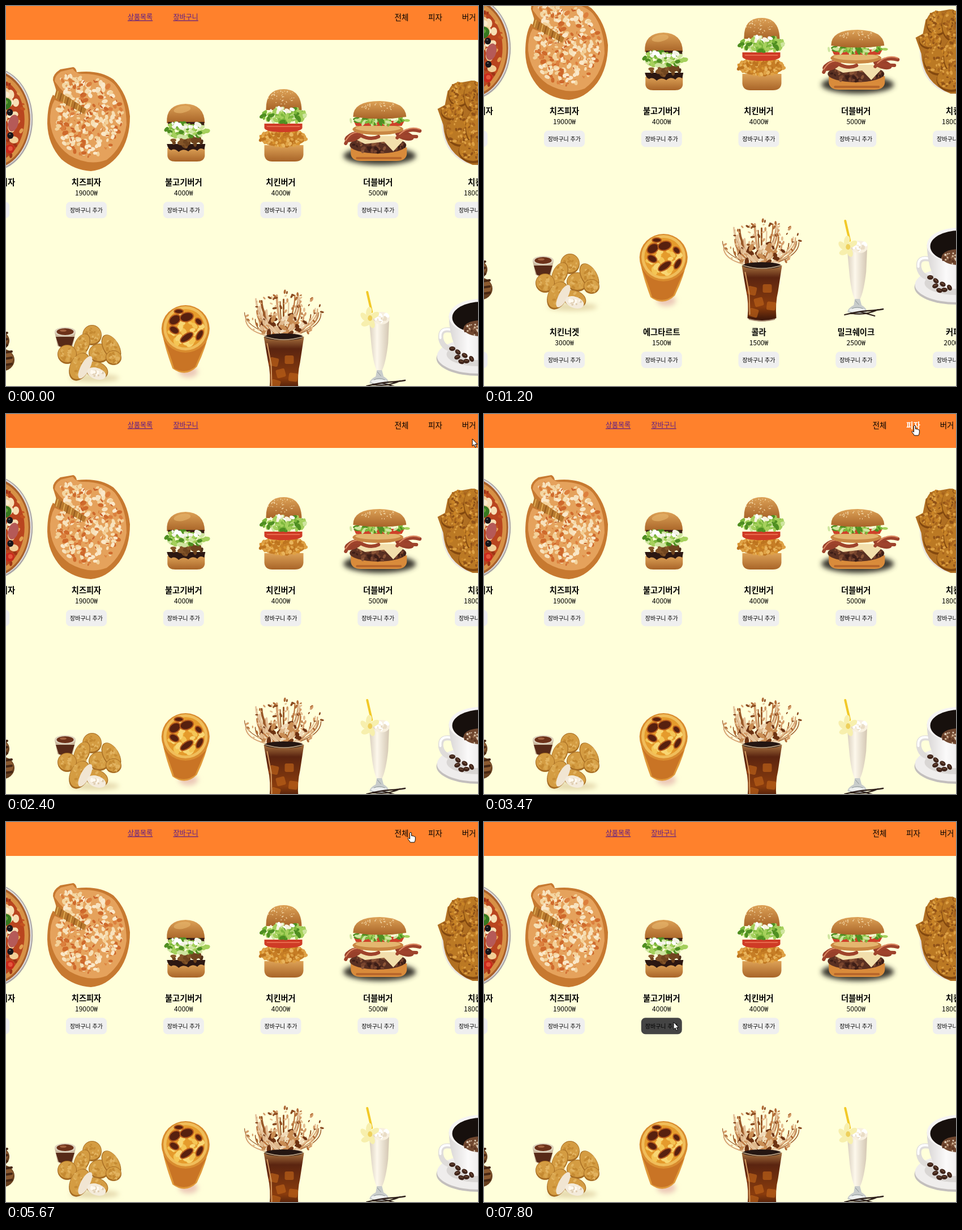
An HTML page that plays this animation: 834x672 px, repeating every 8 s.

```html
<!DOCTYPE html>
<html lang="ko">
<head>
<meta charset="utf-8">
<title>메뉴</title>
<style>
html, body { margin: 0; width: 100%; height: 100%; overflow: hidden; background: #fff; }
svg { display: block; }
text { font-family: "Noto Sans CJK KR", "Noto Sans KR", "Noto Sans CJK JP", sans-serif; }
.link { font-size: 12px; fill: #551a8b; text-decoration: underline; }
.nav { font-size: 13.5px; }
.card text { text-anchor: middle; }
.name { font-size: 14.25px; font-weight: 700; }
.price { font-size: 12px; }
.add { font-size: 10px; }
.btn { fill: #efefef; }
#pizzas, #burgers, #cursor, #hand { opacity: 0; }
</style>
</head>
<body>
<svg width="834" height="672" viewBox="0 0 834 672">
  <defs>
    <filter id="soft" x="-30%" y="-60%" width="160%" height="220%"><feGaussianBlur stdDeviation="4"/></filter>
    <linearGradient id="bun" x2="0" y2="1"><stop stop-color="#dda257"/><stop offset="1" stop-color="#a86428"/></linearGradient>
    <linearGradient id="cola" x2="0" y2="1"><stop stop-color="#b8844a"/><stop offset=".25" stop-color="#5a2410"/><stop offset=".75" stop-color="#8a3c0d"/><stop offset="1" stop-color="#35130a"/></linearGradient>
    <linearGradient id="milk"><stop stop-color="#d8cdbb"/><stop offset=".4" stop-color="#fdf8ec"/><stop offset="1" stop-color="#d3c6b1"/></linearGradient>
    <linearGradient id="china"><stop stop-color="#d9d6d5"/><stop offset=".5" stop-color="#fbfafa"/><stop offset="1" stop-color="#e6e3e2"/></linearGradient>
  </defs>
  <g id="page">
    <g id="all"><rect y="60" width="834" height="800" fill="#ffffda"/></g>
    <g id="pizzas"><rect y="60" width="834" height="368" fill="#ffffda"/></g>
    <g id="burgers"><rect y="60" width="834" height="368" fill="#ffffda"/></g>
    <rect width="834" height="60" fill="#ff812c"/>
    <g id="links">
      <text class="link" x="215" y="24.4">상품목록</text>
      <text class="link" x="295.5" y="24.4">장바구니</text>
    </g>
    <g id="menu">
      <text class="nav" x="686.5" y="25">전체</text>
      <text class="nav" x="746" y="25">피자</text>
      <text class="nav" x="805.7" y="25">버거</text>
    </g>
  </g>
  <g id="cursor" fill="#fff" stroke="#000" stroke-linejoin="round">
    <path id="arrow" d="M0 0V12.6L3 10L5 15L7.2 14L5.2 9.4H9Z"/>
    <path id="hand" d="M-1.5 1.2Q0-.8 1.5 1.2V6.5Q3 5.5 4 7Q5.5 6 6.3 7.8Q8 7 8.3 9V13Q8 16 6.5 18H-.5Q-2 15.5-4.5 12.5Q-5.5 10.5-3.5 10.3L-1.5 12Z"/>
  </g>
</svg>
<script>
const $ = id => document.getElementById(id);

let seed = 7;
const rnd = () => (seed = seed * 16807 % 2147483647) / 2147483647;

// Shapes
const oval = (x, y, rx, ry, fill, turn = 0, more = '') =>
  `<ellipse cx="${x}" cy="${y}" rx="${rx}" ry="${ry}" fill="${fill}" transform="rotate(${turn} ${x} ${y})" ${more}/>`;
const path = (d, fill, more = '') => `<path d="${d}" fill="${fill}" ${more}/>`;
const line = (d, color, width) => path(d, 'none', `stroke="${color}" stroke-width="${width}" stroke-linecap="round"`);
const specks = (n, x, y, rx, ry, colors, a, b = a) => Array.from({ length: n }, () => {
  const angle = rnd() * 2 * Math.PI, r = Math.sqrt(rnd()), size = .5 + rnd() / 2;
  return oval((x + rx * r * Math.cos(angle)).toFixed(1), (y + ry * r * Math.sin(angle)).toFixed(1),
    (a * size).toFixed(1), (b * size).toFixed(1), colors[rnd() * colors.length | 0], rnd() * 180 | 0);
}).join('');
const each = (points, draw) => points.map(p => draw(...p)).join('');
const food = (cx, dy, ...parts) => `<g transform="translate(${-cx} ${dy})">${parts.join('')}</g>`;

const greens = ['#4f8f22', '#7db83c', '#a5d05c', '#cfe5a0'];
const golds = ['#c98427', '#a8641d', '#dda044', '#8f5117'];
const seeds = (x, y, rx, ry) => specks(34, x, y, rx, ry, ['#f6dfb4', '#ecc993'], 1.6, .9);

const pepperoni = food(233.5, 0,
  oval(238, 209, 61, 79, '#9d8f6a', 0, 'filter="url(#soft)" opacity=".7"'),
  oval(235.5, 206, 62, 80, '#c98c3e'), oval(235, 205, 60, 77, '#ebc47c'), oval(235.5, 206, 54, 70, '#dba04a'),
  specks(130, 235, 206, 50, 66, ['#e9bd68', '#cf7a35', '#f0cd80', '#d48d3b'], 5, 3),
  each([[223, 149], [251, 151], [270, 165], [196, 173], [227, 187], [256, 197], [281, 209], [197, 210],
    [230, 226], [208, 248], [247, 253], [272, 241], [232, 275]],
    (x, y) => oval(x, y, 8.5, 10, '#93302a') + oval(x, y - .5, 7.5, 9, '#bf4a42') + specks(7, x, y, 6, 7, ['#d5705c', '#a5352f'], 2)),
  specks(85, 233, 208, 44, 58, ['#4b7a22', '#355d18', '#6b9433'], 2.2, 1.4));

const margherita = food(405.5, 0,
  oval(409, 200.5, 73.5, 92, '#aaa6a8'), oval(408.5, 200, 72, 90, '#e0dcda'),
  oval(409, 200.5, 69, 88, '#a9602a'), oval(409, 200.5, 66, 84, '#d79146'), oval(409, 200.5, 59, 76, '#b9451f'),
  specks(120, 409, 200, 61, 79, ['#d06c2b', '#9e3416', '#e3a052', '#c4511f'], 5, 3),
  specks(62, 408, 200, 50, 66, ['#f7dfb4', '#f2cf97', '#fbeccc'], 9, 7),
  each([[415, 153], [385, 167], [388, 201], [360, 215], [412, 265], [385, 237], [442, 253], [352, 190]],
    (x, y) => oval(x, y, 8, 8, '#c82a1c') + oval(x + 1, y - 1, 4, 4, '#e5573c')),
  oval(448, 207, 9, 15, '#b55a58', 15),
  each([[432, 173, 13, 11], [363, 201, 11, 8], [404, 245, 13, 8], [391, 153, 4, 7], [429, 224, 4, 8]],
    (x, y, rx, ry) => oval(x, y, rx, ry, '#35781f', -12) + oval(x - 1, y - 2, rx * .6, ry * .45, '#63a336', -12)),
  each([[401, 148], [428, 146], [372, 170], [396, 180], [442, 188], [415, 209], [386, 216], [443, 229], [426, 244], [382, 248]],
    (x, y) => oval(x, y, 5.5, 6, '#17151a') + oval(x - 1, y - 2, 1.5, 1.2, '#666')));

const cheese = food(142, 0,
  path('M83 131Q82 121 96 112L119 108Q124 110 125 117Q165 112 190 130Q215 155 219 195Q219 235 200 262Q178 290 150 292Q120 290 98 271Q74 245 73 208Q73 175 83 157L92 163L88 147Z', '#c77930'),
  path('M86 133Q86 123 97 116L118 111Q124 120 134 120Q172 119 192 139Q213 166 213 210Q207 250 178 272Q146 284 112 264Q82 243 78 205Q77 181 86 166L140 190L95 145Z', '#e5a25c'),
  specks(230, 146, 196, 59, 69, ['#f6dfb4', '#fae8c9', '#f3d19a', '#f7e2bd', '#dc7f3d', '#cf6a2c'], 6, 4),
  specks(26, 115, 133, 18, 13, ['#f3d6a2', '#d9813d', '#f8e3be'], 5, 3),
  specks(70, 146, 198, 58, 68, ['#c9602a', '#dc8440'], 4, 1.5),
  path('M89 148L142 182L138 191L85 162Z', '#b8792e'),
  Array.from({ length: 8 }, (_, i) => line(`M${92 + i * 6} ${151 + i * 4}l-3 12`, i % 2 ? '#8f561c' : '#e5b35a', 1.6)).join(''));

const bulgogi = food(313.5, 0,
  path('M285 251H351V265Q350 275 337 275H299Q286 275 285 265Z', 'url(#bun)'),
  path('M284 244H352L350 254Q343 249 338 256Q330 250 322 257Q313 251 305 258Q297 251 292 255Q286 254 284 244Z', '#2c1712'),
  path('M284 207Q282 174 317 173Q350 174 351 207Z', 'url(#bun)'),
  oval(311, 183, 15, 6, '#e8b76e', -10, 'opacity=".6"'),
  path('M286 205H350V212H286Z', '#3b2017'),
  specks(20, 319, 240, 31, 7, ['#70451f', '#845529', '#4e2e18'], 9, 5),
  specks(75, 319, 219, 36, 13, greens, 6, 4),
  specks(13, 316, 211, 27, 6, ['#fff', '#f4f3e6'], 5, 4));

const chicken = food(485, 0,
  path('M456 246H525V263Q524 275 510 275H470Q457 275 456 263Z', 'url(#bun)'),
  path('M459 184Q458 147 490 147Q521 147 522 184Z', 'url(#bun)'), seeds(489, 162, 26, 12),
  oval(489, 233, 41, 16, '#c67d25'),
  specks(100, 489, 233, 41, 16, ['#d9932f', '#e9b45c', '#bd741f', '#dfa145'], 4, 3),
  path('M456 208H523V216Q520 223 489 223Q459 223 456 216Z', '#cf3b26'), line('M461 213H518', '#e8694c', 2),
  specks(80, 490, 193, 39, 12, greens, 7, 4), specks(10, 488, 185, 24, 4, ['#fff', '#f7f3df'], 5, 3));

const double = food(657, 0,
  oval(660, 265, 64, 16, '#3d3a33', 0, 'filter="url(#soft)"'),
  path('M609 250H708V262Q706 274 690 274H627Q611 274 609 262Z', '#d98b3b'),
  line('M620 269H697', '#b8672b', 4),
  oval(657, 246, 50, 15, '#5a3022'), specks(60, 657, 247, 47, 12, ['#79452e', '#3d1e17', '#8d5638'], 5, 3),
  path('M609 230L707 230L700 240L684 257L668 240L634 244L618 236Z', '#f2dfac'),
  each([[614, 231], [704, 229]], (x, y) => oval(x, y, 17, 8, '#98402a', x < 650 ? -22 : 18)),
  line('M600 243Q610 220 627 229T658 231M691 233Q706 214 731 221M699 230L725 231', '#9f432c', 6),
  line('M600 238Q613 217 630 226M695 227Q712 211 731 218', '#dc8a63', 2),
  oval(657, 218, 45, 10, '#c98743'), oval(657, 216, 40, 6, '#e4b66f'),
  path('M614 203H704L699 212H618Z', '#cf412a'),
  specks(70, 658, 201, 51, 8, greens, 7, 3),
  path('M613 196Q613 168 660 168Q706 169 707 196Q660 203 613 196Z', 'url(#bun)'), seeds(660, 179, 36, 8));

const fried = food(828.5, 0,
  path('M769 205Q770 258 812 278L840 283V205Z', '#e9e5df'),
  path('M762 182L775 175L780 150L800 136L822 132L850 140V281H824Q775 262 772 210Z', '#b06f22'),
  each([[800, 157, 19, 22], [825, 160, 17, 28], [788, 188, 20, 15], [803, 222, 27, 27], [829, 215, 18, 32], [825, 257, 26, 21]],
    (x, y, rx, ry) => oval(x, y, rx, ry, '#83480f') + oval(x, y - 2, rx - 1, ry - 2, '#bb7924')
      + specks(48, x, y - 2, rx - 2, ry - 3, golds, 4, 2.5)));

const rolls = food(-29.75, -265,
  each([[-12, 466, 18, 17], [-8, 500, 23, 20]], (x, y, rx, ry) => oval(x, y, rx, ry, '#68401f') + oval(x, y - 3, rx - 2, ry - 5, '#8b5a30')),
  Array.from({ length: 6 }, (_, i) => line(`M-10 ${455 + i * 11}L${i < 3 ? 2 : 10} ${452 + i * 11}`, '#472713', 4)).join(''));

const nuggets = food(142, -265,
  oval(156, 532, 44, 7, '#e5d9ad', 0, 'filter="url(#soft)"'),
  path('M86 451L91 475Q104 484 118 475L123 451Z', '#c9b59b'), path('M88 459L93 475Q104 481 116 475L121 459Z', '#572a18'),
  oval(104.5, 450, 18.5, 8, '#ddd2bd'), oval(104.5, 450, 15, 6, '#6d321a'), oval(101, 448, 6, 2, '#a2613f'),
  each([[152, 456, 17, 18, 0], [134, 474, 13, 22, 25], [165, 488, 19, 17, 0], [186, 478, 14, 25, -30],
    [108, 490, 17, 17, 0], [190, 496, 14, 13, 0], [130, 512, 17, 26, 25], [160, 518, 21, 15, 20]],
    (x, y, rx, ry, a) => oval(x, y, rx, ry, '#a66c23', a) + oval(x, y - 1, rx - 1, ry - 2, '#d49c42', a)
      + specks(22, x, y, rx * .7, ry * .7, ['#e2b360', '#c58a32', '#d9a64e'], 4, 2.5)),
  oval(140, 513, 8, 22, '#f1e5d2', 28), oval(160, 524, 17, 10, '#f4ebdb', 18),
  specks(16, 160, 524, 12, 7, ['#fff9ef', '#dfcdb1'], 3));

const tart = food(313.5, -265,
  oval(322, 521, 17, 10, '#ecc9b8', 0, 'filter="url(#soft)"'),
  path('M275 447Q279 475 294 515Q317 532 337 512Q354 477 359 447Z', '#e0993a'),
  path('M278 463Q290 490 297 515Q317 526 334 512Q345 485 354 468Q316 505 278 463Z', '#c97425'),
  oval(317, 445, 42.5, 42, '#d98c2f'), oval(317, 444, 39, 39, '#f0bd5a'), oval(317, 444, 34, 34, '#e59b2c'),
  specks(30, 317, 444, 29, 29, ['#f4c555', '#f0ad35', '#f8d673'], 8, 5),
  each([[298, 429, 10, 7, -35], [319, 424, 11, 7, -15], [340, 432, 6, 4, 45], [297, 447, 8, 5, 30],
    [319, 460, 12, 5, -35], [342, 456, 4, 9, 30], [305, 414, 7, 3, 0]],
    (x, y, rx, ry, a) => oval(x, y, rx + 2, ry + 2, '#b5591b', a) + oval(x, y, rx, ry, '#57200f', a)));

const splash = Array.from({ length: 34 }, () => {
  const a = -2.75 + rnd() * 2.3, r = 45 + rnd() * 36;
  const x = 490 + r * Math.cos(a), y = 455 + r * Math.sin(a);
  return line(`M490 462Q${x.toFixed()} ${(y + 28).toFixed()} ${x.toFixed()} ${y.toFixed()}`,
    ['#bd7a43', '#9a5a2a', '#d6a272', '#e7c69f'][rnd() * 4 | 0], (1 + rnd() * 3).toFixed(1));
}).join('');
const cola = food(485, -265,
  splash,
  specks(110, 490, 422, 70, 45, ['#b06a35', '#d49c68', '#8a4b20', '#e4bd8f'], 4, 2),
  specks(50, 490, 440, 42, 22, ['#f0d9b8', '#c98d54', '#6d3313', '#dfb88c'], 8, 4),
  path('M455 459Q491 450 526 459L519 505Q514 525 516 552Q490 563 465 552Q468 525 462 500Z', 'url(#cola)'),
  each([[473, 503], [500, 499], [485, 523], [507, 530], [476, 542]],
    (x, y) => `<rect x="${x - 8}" y="${y - 7}" width="16" height="15" rx="3" fill="#b95f18" opacity=".7" transform="rotate(${x % 40 - 20} ${x} ${y})"/>`),
  oval(490.5, 459, 34, 6, '#241612'), line('M458 459Q490 469 524 459', '#c8ad8c', 1.5),
  line('M461 471L468 508L469 545', '#d49a61', 2), line('M468 554Q491 560 513 554', '#a88b74', 2));

const shake = food(657, -265,
  line('M638 380L646 415', '#f2c928', 4),
  path('M641 425Q659 408 677 425L675 470Q671 505 664 519H655Q648 505 645 470Z', 'url(#milk)'),
  oval(663, 426, 15, 11, '#f8f0df'), specks(16, 663, 425, 13, 8, ['#fff', '#e9dcc6'], 5, 3),
  each([[633, 424, 50], [641, 415, -80], [651, 421, -30], [636, 435, -20], [646, 435, 70]],
    (x, y, a) => oval(x, y, 9, 5, '#f7efad', a)), oval(643, 426, 4, 5, '#eed05c'),
  path('M655 518H664L667 529Q677 535 676 541Q659 549 642 541Q642 535 653 529Z', '#c8cccb'),
  oval(659, 538, 14, 4, '#eef0ef'), line('M656 521L662 528M650 535Q659 531 669 535', '#8c9596', 1),
  line('M637 546Q662 540 678 539T705 536M648 543Q672 548 696 537M665 541L690 548', '#30221c', 2.3));

const coffee = food(828.5, -265,
  oval(834, 497, 74, 31, '#c3bfbd'), oval(834, 493, 73, 31, '#efedec'), oval(834, 490, 56, 21, '#d9d6d4'),
  line('M789 448Q765 442 768 463Q772 482 797 482', '#dfdcda', 9), line('M788 447Q765 441 767 461', '#fff', 4),
  path('M782 422Q784 484 816 500H850V400Z', 'url(#china)'),
  oval(838, 423, 56, 31, '#f6f4f3'), oval(839, 425, 51, 28, '#17100d'),
  oval(838, 444, 30, 14, '#70472f'), specks(60, 833, 445, 25, 11, ['#ceb194', '#9c7052', '#5b3421', '#e4d4be'], 2),
  each([[788, 480, 0], [798, 486, 40], [797, 495, -20], [810, 492, 30], [813, 502, 0], [822, 498, 60], [804, 503, 20]],
    (x, y, a) => oval(x, y, 5.5, 4, '#3e2319', a) + oval(x, y - 1, 3.5, .8, '#75503c', a)));

// Cards
const pizzaMenu = [['페퍼로니피자', 20000, pepperoni], ['마르게리따피자', 23000, margherita], ['치즈피자', 19000, cheese]];
const burgerMenu = [['불고기버거', 4000, bulgogi], ['치킨버거', 4000, chicken], ['더블버거', 5000, double]];
const sideMenu = [['치즈스틱', 2000, rolls], ['치킨너겟', 3000, nuggets], ['에그타르트', 1500, tart],
  ['콜라', 1500, cola], ['밀크쉐이크', 2500, shake], ['커피', 2000, coffee]];

const row = (id, items, left, top = 0) => $(id).insertAdjacentHTML('beforeend', items.map(([name, price, art], i) => `
  <g class="card" transform="translate(${left + i * 171.75} ${top})">${art}
    <text class="name" y="316.5">${name}</text>
    <text class="price" y="335">${price}₩</text>
    <rect class="btn" x="-36" y="346.3" width="72" height="29" rx="7.5"/>
    <text class="add" y="364.7">장바구니 추가</text>
  </g>`).join(''));
row('all', [...pizzaMenu.slice(1), ...burgerMenu, ['치킨', 18000, fried]], -29.75);
row('all', sideMenu, -29.75, 391);
row('pizzas', pizzaMenu, 233.5);
row('burgers', burgerMenu, 233.5);

// Timeline in ticks of 1/15 s; changes land slightly ahead of each tick
const ticks = 120;
const track = (el, keys) => el.animate(
  keys.map(([tick, style]) => ({ offset: Math.max(0, (tick - .15) / ticks), easing: 'step-end', ...style })),
  { duration: 8000, iterations: Infinity });
const during = (el, spans, on, off) =>
  track(el, [[0, off], ...spans.flatMap(([a, b]) => b < ticks ? [[a, on], [b, off]] : [[a, on]])]);
const move = (x, y) => ({ transform: `translate(${x}px, ${y}px)` });
const shown = { opacity: 1 }, hidden = { opacity: 0 };

track($('page'), [[0, 0], [14, 8], [15, 38], [16, 76], [17, 109], [18, 126],
  [23, 122], [24, 110], [25, 88], [26, 48], [27, 14], [28, 0]].map(([t, y]) => [t, move(0, -y)]));

const filtered = [[54, 85]];
during($('all'), filtered, hidden, shown);
during($('pizzas'), [[54, 67]], shown, hidden);
during($('burgers'), [[67, 85]], shown, hidden);
during($('links'), filtered, move(6.5, 0), move(0, 0));
during($('menu'), filtered, move(12.7, 0), move(0, 0));

const [navAll, navPizza, navBurger] = document.querySelectorAll('.nav');
const lit = { fill: '#fff', fontWeight: 700 }, plain = { fill: '#000', fontWeight: 400 };
during(navAll, [[82, 85]], lit, plain);
during(navPizza, [[41, 42], [50, 60], [79, 80]], lit, plain);
during(navBurger, [[65, 77]], lit, plain);

const buttons = document.querySelectorAll('#all .btn');
const dark = { fill: '#444' }, pale = { fill: '#efefef' };
during(buttons[1], [[109, 114]], dark, pale);
during(buttons[2], [[116, 120]], dark, pale);

// Pointer: start tick, number of steps, end point
const trip = [[36, 1, 824, 44], [37, 2, 745, 39], [40, 1, 790, 30], [41, 1, 762, 21], [42, 3, 309, 258],
  [47, 4, 761, 22], [51, 1, 761, 20], [58, 8, 820, 19], [77, 6, 715, 18], [86, 12, 283, 24],
  [98, 3, 322, 22], [104, 6, 146, 355], [114, 4, 335, 354]];
let px = 824, py = 44;
const stops = [[0, move(px, py)]];
for (const [start, n, x, y] of trip) {
  for (let i = 1; i <= n; i++)
    stops.push([start + i - 1, move(px + (x - px) * i / n, py + (y - py) * i / n)]);
  [px, py] = [x, y];
}
track($('cursor'), stops);
during($('cursor'), [[36, 120]], shown, hidden);
const pointing = [[41, 42], [50, 60], [65, 77], [79, 80], [82, 86], [96, 97], [98, 104]];
during($('hand'), pointing, shown, hidden);
during($('arrow'), pointing, hidden, shown);
</script>
</body>
</html>
```
